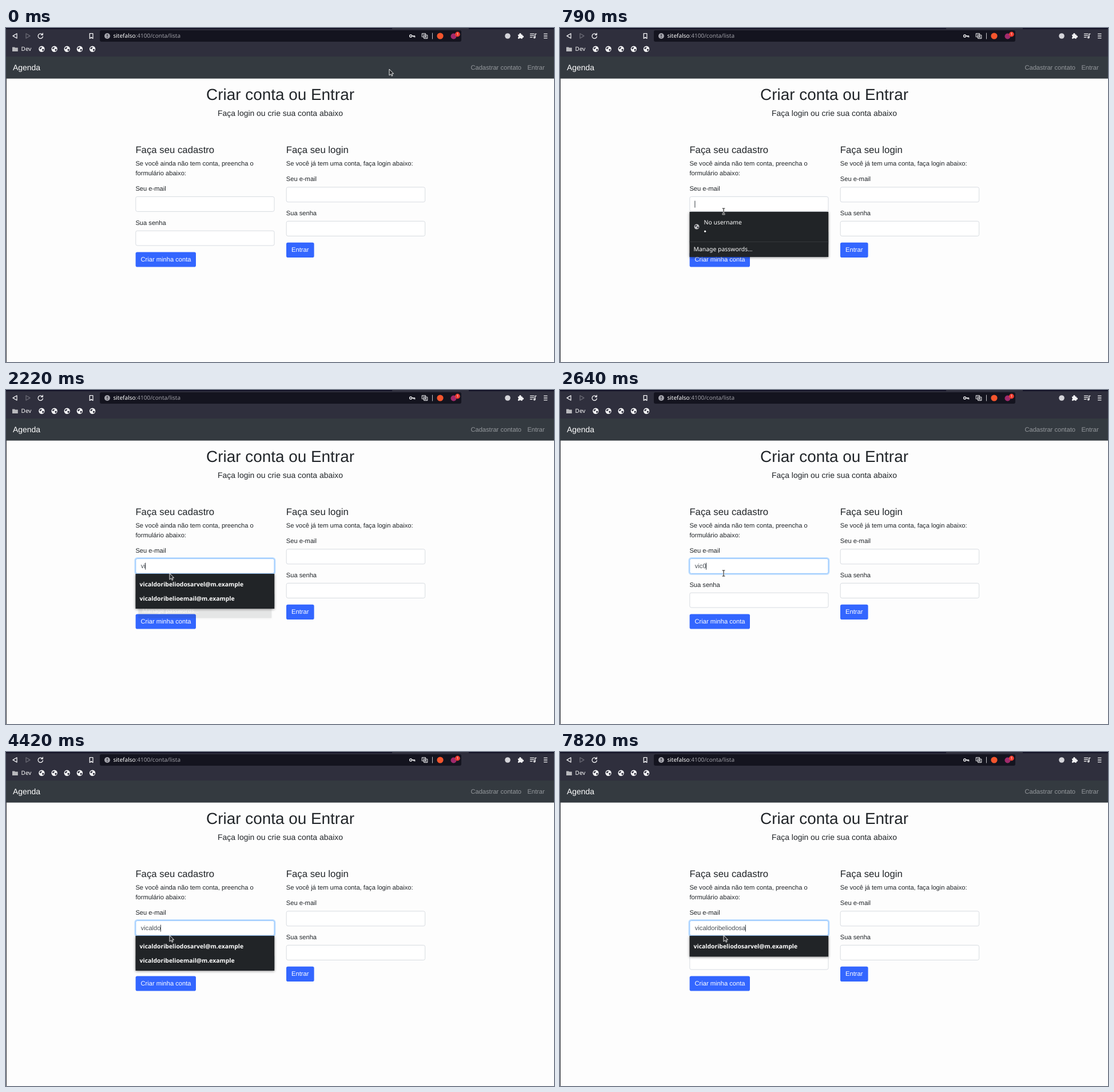
Animation, 958 px wide and 585 px high, one loop 8 s. Source, as an HTML page:

```html
<!DOCTYPE html>
<html lang="pt">
<head>
<meta charset="utf-8">
<title>Agenda</title>
<style>
html, body { margin: 0; width: 100%; height: 100%; overflow: hidden; background: #fdfdfd; }
svg { display: block; width: 958px; height: 585px; }
text { font-family: "Liberation Sans", Arial, sans-serif; font-size: 11.15px; fill: #212529; white-space: pre; text-rendering: geometricPrecision; }
.ui { font-family: "Noto Sans", "Open Sans", sans-serif; font-size: 10.4px; fill: #fff; }
.small { font-size: 10px; }
.strong { font-weight: 600; }
.h1 { font-size: 27.9px; }
.h4 { font-size: 16.75px; }
.lead { font-size: 13.93px; }
.white { fill: #fff; }
.link { fill: #94989c; }
.field { fill: #fff; stroke: #ced4da; stroke-width: .8; }
.btn { fill: #3366ff; }
.line { fill: none; stroke: #f2f2f4; stroke-width: 1.3; stroke-linejoin: round; stroke-linecap: round; }
.popup { filter: drop-shadow(0 1px 2px rgba(0,0,0,.45)); }
.panel { fill: #212427; }
</style>
</head>
<body>
<svg viewBox="0 0 958 585">
  <defs>
    <g id="globe">
      <circle r="5.2" fill="#f4f4f6"/>
      <path d="M-4-1.5Q-2-4 0-3.2Q1-1.6-1-.8L-2.4.6ZM.4.4Q3-.8 4.2.8Q3.6 3.4 1.4 3.6L1.2 2Z" fill="#2f2f3d"/>
    </g>
  </defs>

  <rect width="958" height="585" fill="#fdfdfd"/>
  <rect y="50" width="1" height="535" fill="#34363c"/>

  <!-- browser bars -->
  <rect width="958" height="51" fill="#2f2f3d"/>
  <path d="M0 0H675V2H0ZM809 0H958V2H809Z" fill="#121126"/>
  <rect x="164" y="4" width="632" height="20" rx="3" fill="#14141f"/>
  <path class="line" d="M19 9.8V18L12 13.9Z"/>
  <path class="line" d="M35 9.8V18L42 13.9Z" stroke-opacity=".3"/>
  <path class="line" d="M63.6 11.5A4.2 4.2 0 1 0 64.4 15M64.3 9.2V12H61.4"/>
  <path class="line" d="M146.3 9.6H151.9V18.4L149.1 16.2L146.3 18.4Z"/>
  <circle cx="177" cy="14" r="5" fill="#a3a3ab"/>
  <path d="M176.4 11H177.6V14.6H176.4ZM176.4 15.8H177.6V17H176.4Z" fill="#14141f"/>
  <text class="ui small" x="187.5" y="17.2">sitefalso<tspan fill="#a0a0a8">:4100/conta/lista</tspan></text>
  <g class="line">
    <circle cx="707.6" cy="14" r="2"/>
    <path d="M710 14H714.6V16M712.6 14V15.6"/>
    <rect x="727.6" y="9.6" width="6" height="6" stroke-width="1"/>
    <rect x="731" y="12.4" width="5.8" height="6" stroke-width="1"/>
    <path d="M729 12H732M733 17L734 14.4L735 17" stroke-width=".8"/>
    <path d="M745.5 9V19" stroke-width=".8"/>
    <path d="M916.5 10.4H923M916.5 13.4H923M916.5 16.4H920M925 16.4V10.4H927"/>
    <circle cx="923.8" cy="16.6" r="1.2"/>
    <path d="M940.6 10.4H946M940.6 14H946M940.6 17.6H946"/>
  </g>
  <circle cx="759" cy="14" r="5.6" fill="#f4552d"/>
  <circle cx="782.5" cy="14.5" r="5" fill="#a02a6c"/>
  <circle cx="789.4" cy="11" r="4.4" fill="#ee3b2f"/>
  <text class="ui" x="787.8" y="13.4" style="font-size:6.5px">1</text>
  <circle cx="877" cy="14" r="4.8" fill="#d5d5da"/>
  <path d="M895 11.4H897.2A1.8 1.8 0 1 1 900.6 11.4H902.8V13.4A1.8 1.8 0 1 1 902.8 16.8V18.8H900.4A1.6 1.6 0 0 0 897.4 18.8H895V16.4A1.6 1.6 0 0 0 895 13.4Z" fill="#f2f2f4"/>
  <path d="M11 33.4H15L16.2 34.6H20.8V41H11Z" fill="#b9b9bd"/>
  <text class="ui small" x="26.6" y="40.4">Dev</text>
  <use href="#globe" x="62.4" y="36.8"/>
  <use href="#globe" x="84.6" y="36.8"/>
  <use href="#globe" x="106.7" y="36.8"/>
  <use href="#globe" x="128.9" y="36.8"/>
  <use href="#globe" x="151.1" y="36.8"/>

  <!-- page -->
  <rect y="50" width="958" height="38.6" fill="#343a40"/>
  <text class="lead white" x="12" y="74">Agenda</text>
  <text class="link" x="812.4" y="73">Cadastrar contato</text>
  <text class="link" x="911.4" y="73">Entrar</text>
  <text class="h1" x="479.5" y="126" text-anchor="middle">Criar conta ou Entrar</text>
  <text class="lead" x="479.5" y="154" text-anchor="middle">Faça login ou crie sua conta abaixo</text>

  <text class="h4" x="226.4" y="219">Faça seu cadastro</text>
  <text x="226.4" y="240.8">Se você ainda não tem conta, preencha o</text>
  <text x="226.4" y="257.5">formulário abaixo:</text>
  <text x="226.4" y="285">Seu e-mail</text>
  <rect class="field" x="226.8" y="295.4" width="242.2" height="26" rx="2.8"/>
  <g id="ring">
    <rect x="225.6" y="294.2" width="244.6" height="28.4" rx="4" fill="none" stroke="#bfdeff" stroke-width="2.4"/>
    <rect x="226.8" y="295.4" width="242.2" height="26" rx="2.8" fill="#fff" stroke="#80bdff" stroke-width=".9"/>
  </g>
  <text id="typed" x="235.8" y="312" style="fill:#495057"></text>
  <rect id="caret" y="302.6" width="1" height="12" fill="#343a40"/>
  <text x="226.4" y="344.5">Sua senha</text>
  <rect class="field" x="226.8" y="355.2" width="242.2" height="25.8" rx="2.8"/>
  <rect class="btn" x="226.6" y="392.4" width="105.4" height="26.2" rx="2.8"/>
  <text class="white" x="235.5" y="409.2">Criar minha conta</text>

  <text class="h4" x="489.8" y="219">Faça seu login</text>
  <text x="489.8" y="240.8">Se você já tem uma conta, faça login abaixo:</text>
  <text x="489.8" y="268.3">Seu e-mail</text>
  <rect class="field" x="490.2" y="278.8" width="242.4" height="26" rx="2.8"/>
  <text x="489.8" y="328">Sua senha</text>
  <rect class="field" x="490.2" y="338.4" width="242.4" height="26" rx="2.8"/>
  <rect class="btn" x="490" y="375.8" width="48.6" height="26.2" rx="2.8"/>
  <text class="white" x="499" y="392.4">Entrar</text>

  <g id="saved" class="popup">
    <rect class="panel" x="226.5" y="322" width="242.7" height="79"/>
    <path d="M226.5 374.5H469.2" stroke="#34373b"/>
    <use href="#globe" transform="translate(239 348) scale(.85)" opacity=".75"/>
    <text class="ui" x="251.6" y="343.6">No username</text>
    <circle cx="253.6" cy="356.2" r="1.6" fill="#fff"/>
    <text class="ui" x="233.6" y="391">Manage passwords…</text>
  </g>
  <g id="hints" class="popup">
    <rect id="hintBox" class="panel" x="226.5" y="322" width="242.7" height="61"/>
    <text class="ui strong" x="233.6" y="344">vicaldoribeliodosarvel@m.example</text>
    <text id="hint2" class="ui strong" x="233.6" y="369">vicaldoribelioemail@m.example</text>
  </g>

  <path id="arrow" d="M0 0V11L2.6 8.7L4.3 12.2L6 11.4L4.4 8H7.6Z" fill="#26282c" stroke="#fff" stroke-width=".9"/>
  <g id="beam" fill="none">
    <path d="M-2.4-5H2.4M0-5V5M-2.4 5H2.4" stroke="#fff" stroke-width="2.4"/>
    <path d="M-2.4-5H2.4M0-5V5M-2.4 5H2.4" stroke="#222" stroke-width="1.1"/>
  </g>
</svg>
<script>
const LOOP = 8000;
const NAME = 'vicaldoribeliodosarvel';
// [time, letters of NAME in the field]
const KEYS = [
  [1990, 1], [2190, 2], [2400, 3], [3130, 2], [3800, 3], [3860, 4], [3940, 5],
  [4240, 6], [4420, 7], [5660, 8], [5750, 9], [6180, 10], [6410, 11], [6660, 12],
  [7040, 13], [7160, 14], [7400, 15], [7680, 16], [7750, 17], [7820, 18]
];
const $ = id => document.getElementById(id);
const [ring, typed, caret, saved, hints, hintBox, hint2, arrow, beam] =
  ['ring', 'typed', 'caret', 'saved', 'hints', 'hintBox', 'hint2', 'arrow', 'beam'].map($);

const ramp = (t, a, b) => Math.min(1, Math.max(0, (t - a) / (b - a)));
const within = (t, a, b) => t >= a && t < b;
const show = (el, on) => el.setAttribute('visibility', on ? 'visible' : 'hidden');
const place = (el, x, y) => el.setAttribute('transform', `translate(${x} ${y})`);

// Popups fade while scaling slightly around their centre.
function popup(el, level, cy) {
  const s = 0.955 + 0.045 * level;
  show(el, level > 0);
  el.setAttribute('opacity', level);
  el.setAttribute('transform', `translate(347.8 ${cy}) scale(${s}) translate(-347.8 ${-cy})`);
}

function draw(t) {
  const key = KEYS.filter(k => k[0] <= t).pop();
  const text = NAME.slice(0, key ? key[1] : 0) + (within(t, 2520, 3050) ? '0' : '');
  typed.textContent = text;
  caret.setAttribute('x', 235.4 + (text ? typed.getComputedTextLength() - .2 : 0));
  show(caret, t >= 790 && !within(t, 1720, 1990) && !within(t, 5380, 5660));
  ring.setAttribute('opacity', ramp(t, 790, 1000));

  popup(saved, t < 790 ? 0 : 1 - ramp(t, 2050, 2240), 361.5);
  const open = t < 2800
    ? ramp(t, 2100, 2180) * (1 - ramp(t, 2500, 2630))
    : ramp(t, 3160, 3290);
  const single = t >= 7450;
  popup(hints, open, single ? 340 : 352.5);
  hintBox.setAttribute('height', single ? 36.4 : 61);
  show(hint2, open > 0 && !single);

  const p = ramp(t, 70, 480);
  const m = p * p * (3 - 2 * p);
  const overText = p === 1 && open === 0;
  place(arrow, 670 - 384 * m, 72 + 249 * m);
  place(beam, 286, 321);
  show(arrow, !overText);
  show(beam, overText);
}

const start = performance.now();
function tick() {
  draw((performance.now() - start) % LOOP);
  requestAnimationFrame(tick);
}
tick();
</script>
</body>
</html>
```
